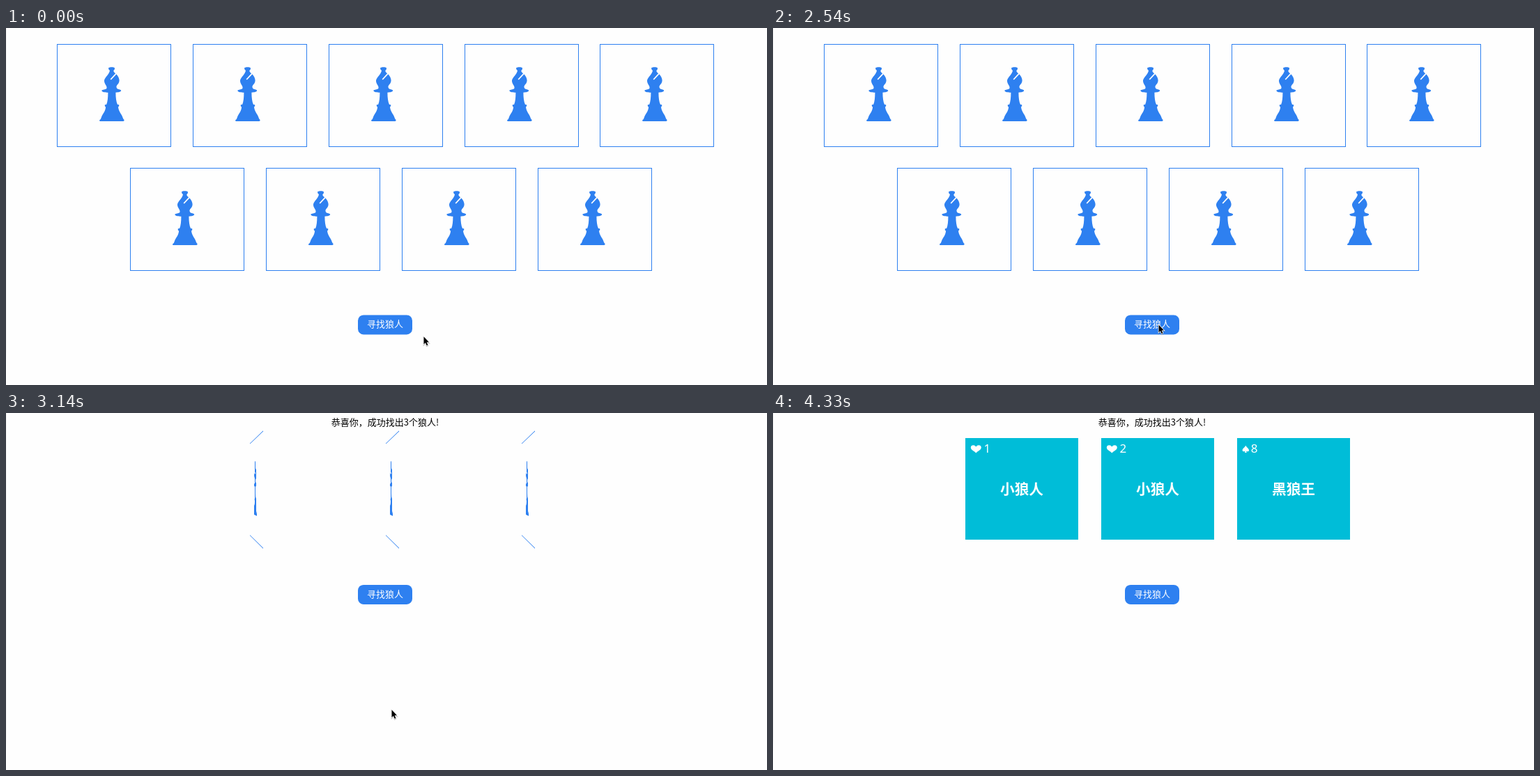
These frames come from a looping animation (1092x513 px, 4.78 s). An HTML page:

```html
<!DOCTYPE html>
<html lang="zh-CN">
<head>
<meta charset="utf-8">
<title>寻找狼人</title>
<style>
  html, body { margin: 0; width: 100%; height: 100%; overflow: hidden; background: #fefefe; }
  #stage { position: absolute; left: 0; top: 0; width: 1092px; height: 513px; overflow: hidden; }
  #edge { position: absolute; left: 0; top: 0; width: 1px; height: 486px;
    background: linear-gradient(#f2f2f2 95%, #fefefe); }
  .card { position: absolute; width: 162px; height: 146px; perspective: 650px; }
  .face { position: absolute; }
  /* The blank margin keeps the border off the layer's edge while it turns */
  .front { left: -4px; top: -4px; width: 172px; height: 156px; background: #fefefe; }
  .frame { position: absolute; left: 4px; top: 4px; width: 162px; height: 146px;
    border: 1px solid #2e80f0; }
  .frame svg { position: absolute; left: -1px; top: -1px; }
  .back { left: 0; top: 0; width: 162px; height: 146px; background: #00bdd8; }
  .back svg { position: absolute; left: 0; top: 0; fill: #fff; }
  .layer { position: absolute; left: 0; top: 0; }
  text { font: 13px "Noto Sans CJK SC", "Noto Sans CJK", sans-serif; text-anchor: middle; }
  .role { font-size: 20.7px; font-weight: 700; }
  .rank { font: 17px "Noto Sans", sans-serif; text-anchor: start; }
  #cursor { filter: drop-shadow(0 1px .7px rgba(0, 0, 0, .3)); }
</style>
</head>
<body>
<div id="stage">
  <div id="edge"></div>
  <div id="all"></div>
  <div id="found"></div>
  <svg class="layer" width="1092" height="513">
    <text id="message" x="544" y="17.7">恭喜你，成功找出3个狼人!</text>
    <g id="button">
      <rect x="505" width="78" height="28" rx="8" fill="#2e80f0"/>
      <text x="544" y="18" fill="#fff">寻找狼人</text>
    </g>
    <path id="cursor" d="M1 1V11.9L3.4 9.7L5.2 13.7L6.9 12.9L5.2 9.1H8.5Z"
      stroke="#fff" stroke-width="1.6" paint-order="stroke"/>
  </svg>
</div>
<script>
const LOOP = 4780, STEP = 150, REVEAL = 2690;
const FLIP_START = 2764, FLIP_TIME = 785, PITCH = 194.85;
const $ = id => document.getElementById(id);

const bishop = `<svg width="164" height="148"><path fill="#2e80f0" d="M74 34.3C76 32.8 81.5 32.8 83 34.3
  L82.8 36.4L81.3 38.3C81.3 40.5 83.3 41.5 85.3 43.2C88 46 89.6 49.5 89.6 52.3C89.6 57 86 58.5 85.5 61
  C85.3 62.5 86 63.5 87 64.6C89 65.5 92 65.6 92.2 67C92 69.3 86 69.5 84.4 69.7C84.4 77 85.2 83 87 87
  L89 87.3C89.6 88.5 89.3 89.8 88 90.5C88.5 97 93.3 101 94.8 106.5C95.3 108 96.6 108.5 96.6 109.6
  C96.6 110.5 96.3 111 95.3 111H62.3C61.1 111 60.8 110 61.3 109.3C62.8 108.5 63.3 107 63.8 105.5
  C65.6 100 69.8 97 70.1 90.5C68.8 90 68.4 88.5 69 87.3L71.1 87C72.8 83 73.4 77 73.4 69.7
  C70 69.5 65 69.5 64.3 67C64.5 65.8 68 65.5 71 64.5C72 63 71.5 61 70.5 59.5
  C69 57 67.8 55 68 52.3C69 47.8 74.8 44 76 38.3L74.4 36.6Z"/>
  <path d="M85.4 42.2L77.2 51" stroke="#fefefe" stroke-width="1.7"/></svg>`;

const heart = 'M15.3 21.6C13 18.5 7.8 17.5 7.8 13.6C7.8 9.4 13.6 9 15.3 12.6' +
  'C17 9 22.8 9.4 22.8 13.6C22.8 17.5 17.6 18.5 15.3 21.6Z';
const spade = 'M12.3 10.5C13 13 17 15 17 17.4C17 19.8 13.8 19.8 12.8 18.2L13.8 21H10.8' +
  'L11.8 18.2C10.8 19.8 7.6 19.8 7.6 17.4C7.6 15 11.6 13 12.3 10.5Z';

const back = ({ suit, x, rank, role }) => `<div class="face back"><svg width="162" height="146">
  <path d="${suit}"/><text class="rank" x="${x}" y="21">${rank}</text>
  <text class="role" x="81" y="81">${role}</text></svg></div>`;

const card = (x, y, extra = '') => `<div class="card" style="left:${x}px;top:${y}px">
  <div class="face front"><div class="frame">${bishop}</div></div>${extra}</div>`;

const row = (n, x, y) => Array.from({ length: n }, (_, i) => card(x + i * PITCH, y)).join('');

const wolves = [
  { suit: heart, x: 26.5, rank: 1, role: '小狼人' },
  { suit: heart, x: 26.5, rank: 2, role: '小狼人' },
  { suit: spade, x: 19.8, rank: 8, role: '黑狼王' }
];

$('all').innerHTML = row(5, 73, 23) + row(4, 178.4, 201.4);
$('found').innerHTML = wolves.map((w, i) => card(276 + i * PITCH, 36, back(w))).join('');
const fronts = $('found').querySelectorAll('.front');
const backs = $('found').querySelectorAll('.back');

// Pointer stops: time, x, y
const stops = [
  [0, 598.5, 442.5], [1190, 573, 422], [1340, 567.5, 420.5], [1790, 562, 422],
  [1940, 551, 426], [2090, 553.5, 427], [2240, 548.5, 427], [2540, 552.5, 425.5],
  [4040, 997, 501], [4190, 1015, 511], [4330, 1100, 530]
];

// Same curve as CSS ease-in-out
function easeInOut(t) {
  if (t <= 0 || t >= 1) return t <= 0 ? 0 : 1;
  let lo = 0, hi = 1;
  for (let i = 0; i < 24; i++) {
    const u = (lo + hi) / 2, v = 1 - u;
    if (1.26 * v * v * u + 1.74 * v * u * u + u * u * u < t) lo = u; else hi = u;
  }
  return lo * lo * (3 - 2 * lo);
}

const show = (el, on) => { el.style.display = on ? '' : 'none'; };

function turn(el, on, deg) {
  show(el, on);
  el.style.transform = deg ? `rotateY(${deg}deg)` : 'none';
}

function draw(t) {
  const revealed = t >= REVEAL;
  show($('all'), !revealed);
  show($('found'), revealed);
  show($('message'), revealed);
  $('button').setAttribute('transform', `translate(0 ${revealed ? 246.9 : 412.4})`);

  // The flip is seen in steps, as in a screen recording
  const seen = REVEAL + Math.floor((t - REVEAL) / STEP) * STEP;
  const angle = 180 * easeInOut((seen - FLIP_START) / FLIP_TIME);
  fronts.forEach(f => turn(f, angle < 90, -angle));
  backs.forEach(b => turn(b, angle >= 90, 180 - angle));

  const [, x, y] = stops.filter(s => s[0] <= t).pop();
  $('cursor').setAttribute('transform', `translate(${x} ${y})`);
}

const begin = performance.now();
function tick() {
  draw((performance.now() - begin) % LOOP);
  requestAnimationFrame(tick);
}
tick();
</script>
</body>
</html>
```
